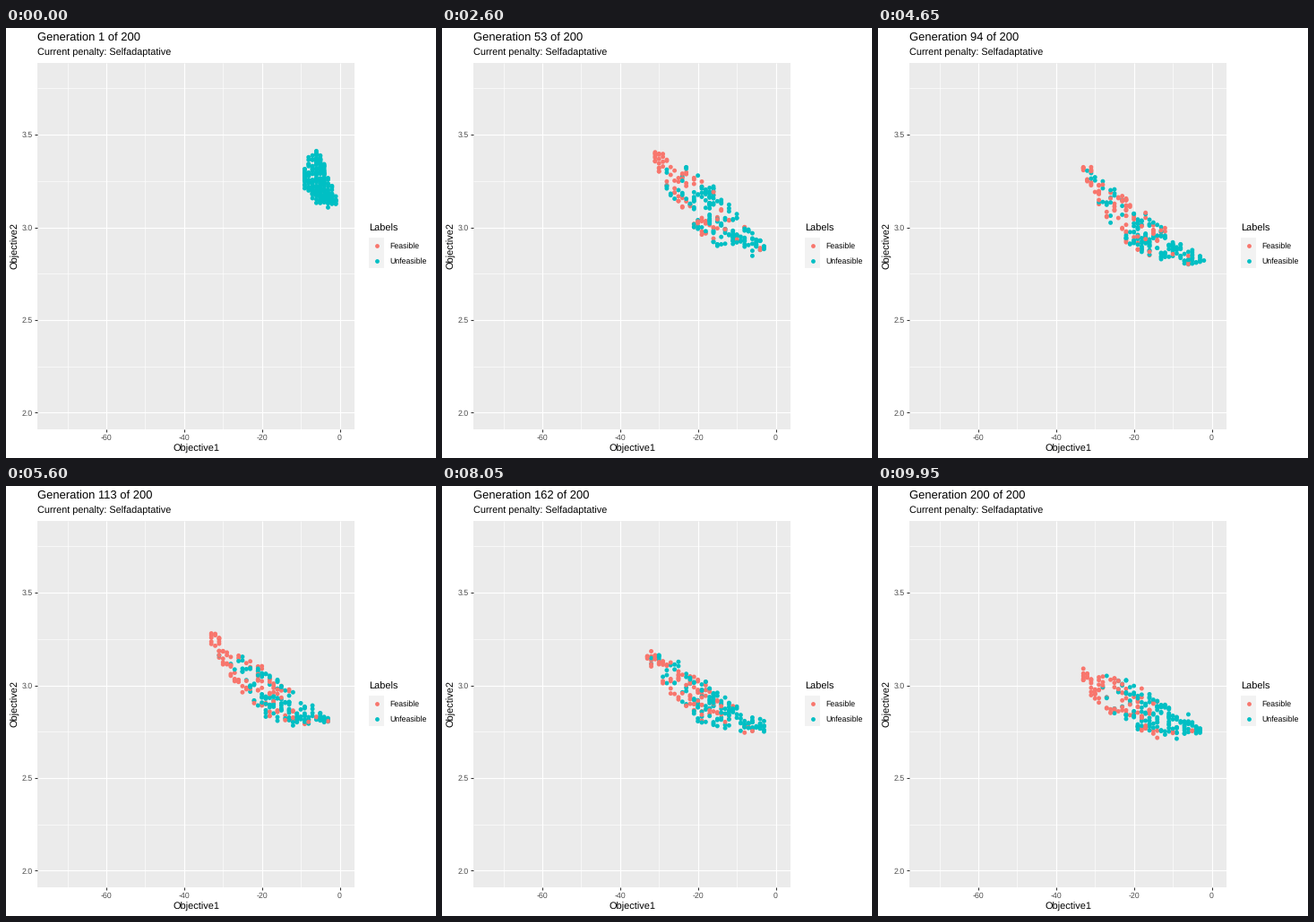
Recreate the animation shown at these times as a matplotlib script. Size 480 px wide and 480 px high, loop 10 s.

```python
import matplotlib.pyplot as plt
import numpy as np
from matplotlib.animation import FuncAnimation
from matplotlib.patches import Rectangle

SIZE, DPI = 480, 72
GENERATIONS, POPULATION, TWINS = 200, 165, 90
TURNOVER, LEAD = 0.3, 2
FEASIBLE, UNFEASIBLE = "#F8766D", "#00BFC4"
LEFT, TOP, RIGHT, BOTTOM = 35, 39, 389, 448

plt.rcParams["font.family"] = "Liberation Sans"
plt.rcParams["text.hinting"] = "no_hinting"


def px(x):
    return 372.5 + 4.342 * x


def py(y):
    return 222.6 - 206.8 * (y - 3)


def front(g, s, v):
    """Place individuals at s (right 0 to left 1) and v (low 0 to high 1)."""
    right = -1 - 1.5 * (1 - np.exp((1 - g) / 15))
    left = -33.2 + 25 * np.exp(-g / 20)
    floor = 2.7 + 0.31 * np.exp(-g / 91) + 0.13 * np.exp(-g / 12)
    rise = 0.08 + 0.42 * (1 - np.exp(-g / 14)) - 0.22 * (g / GENERATIONS) ** 3
    depth = 0.2 + 0.1 * np.exp(-((g - 40) / 35) ** 2)
    x = right + (left - right) * s
    height = 0.03 + depth * np.sin(np.pi * s ** 1.4) ** 0.8
    y = floor + rise * s ** 3.2 + height * v
    feasible_share = (0.05 + 0.9 * s ** 1.7) * (1 - np.exp((1 - g) / 8))
    return np.round(x), y, feasible_share


def evolve():
    """Every generation replaces a random part of the population."""
    rng = np.random.default_rng(11)
    u = rng.permutation(np.linspace(0, 1, POPULATION))
    spread = u + 0.07 * np.sin(2 * np.pi * u)
    state = np.zeros((4, POPULATION))
    history = []
    for g in range(1, GENERATIONS + 1):
        first = g == 1
        born = rng.random(POPULATION) < (1 if first else TURNOVER)
        target = 1 if first else min(g + LEAD, GENERATIONS)
        s = np.clip(spread + rng.normal(0, 0.01, POPULATION), 0, 1)
        x, y, share = front(target, s, rng.random(POPULATION))
        fit = rng.random(POPULATION) < share
        twin_y = y + rng.normal(0, 0.014, POPULATION)
        state = np.where(born, [x, y, fit, twin_y], state)
        x, y, fit, twin_y = state
        history.append((np.append(x, x[:TWINS]),
                        np.append(y, twin_y[:TWINS]),
                        np.append(fit, fit[:TWINS])))
    return history


HISTORY = evolve()

fig = plt.figure(figsize=(SIZE / DPI, SIZE / DPI), dpi=DPI, facecolor="white")
ax = fig.add_axes([0, 0, 1, 1])
ax.set(xlim=(0, SIZE), ylim=(SIZE, 0))
ax.axis("off")


def box(x, y, w, h, color):
    ax.add_patch(Rectangle((x, y), w, h, fc=color, lw=0, zorder=0))


def line(xs, ys, color, width):
    ax.plot(xs, ys, color=color, lw=width, solid_capstyle="butt", zorder=1)


def label(x, y, text, size, color="black", **kw):
    return ax.text(x, y, text, fontsize=size, color=color, va="baseline", **kw)


def grid(xs, ys, width):
    for x in xs:
        line([px(x)] * 2, [TOP, BOTTOM], "white", width)
    for y in ys:
        line([LEFT, RIGHT], [py(y)] * 2, "white", width)


x_ticks, y_ticks = np.arange(-60, 1, 20), np.arange(2, 3.6, 0.5)
box(LEFT, TOP, RIGHT - LEFT, BOTTOM - TOP, "#EBEBEB")
grid(np.arange(-70, 0, 20), y_ticks + 0.25, 0.6)
grid(x_ticks, y_ticks, 1.1)

GREY = "#4D4D4D"
for x in x_ticks:
    line([px(x)] * 2, [BOTTOM, BOTTOM + 2.75], "#333333", 1.07)
    label(px(x), 460, f"{x}", 8.8, GREY, ha="center")
for y in y_ticks:
    line([LEFT - 2.75, LEFT], [py(y)] * 2, "#333333", 1.07)
    label(30, py(y) + 3.2, f"{y:.1f}", 8.8, GREY, ha="right")

title = label(35, 14, "", 13)
label(35, 31, "Current penalty: Selfadaptative", 10.9)
label(212, 472.7, "Objective1", 11, ha="center")
label(13, 243, "Objective2", 11, ha="center", rotation=90,
      rotation_mode="anchor")

label(405, 227, "Labels", 11)
legend = (("Feasible", FEASIBLE, 242.5), ("Unfeasible", UNFEASIBLE, 259.7))
for name, color, y in legend:
    box(405, y - 8.6, 17.3, 17.3, "#F2F2F2")
    ax.scatter([413.9], [y], s=23, c=color, lw=0, zorder=3)
    label(428, y + 3.3, name, 8.8)

dots = ax.scatter([], [], s=24, lw=0, zorder=3)


def draw(frame):
    x, y, fit = HISTORY[frame]
    title.set_text(f"Generation {frame + 1} of {GENERATIONS}")
    dots.set_offsets(np.column_stack([px(x), py(y)]))
    dots.set_facecolors(np.where(fit > 0, FEASIBLE, UNFEASIBLE))
    return title, dots


anim = FuncAnimation(fig, draw, frames=GENERATIONS, interval=50,
                     repeat=True, repeat_delay=0)
plt.show()
```
